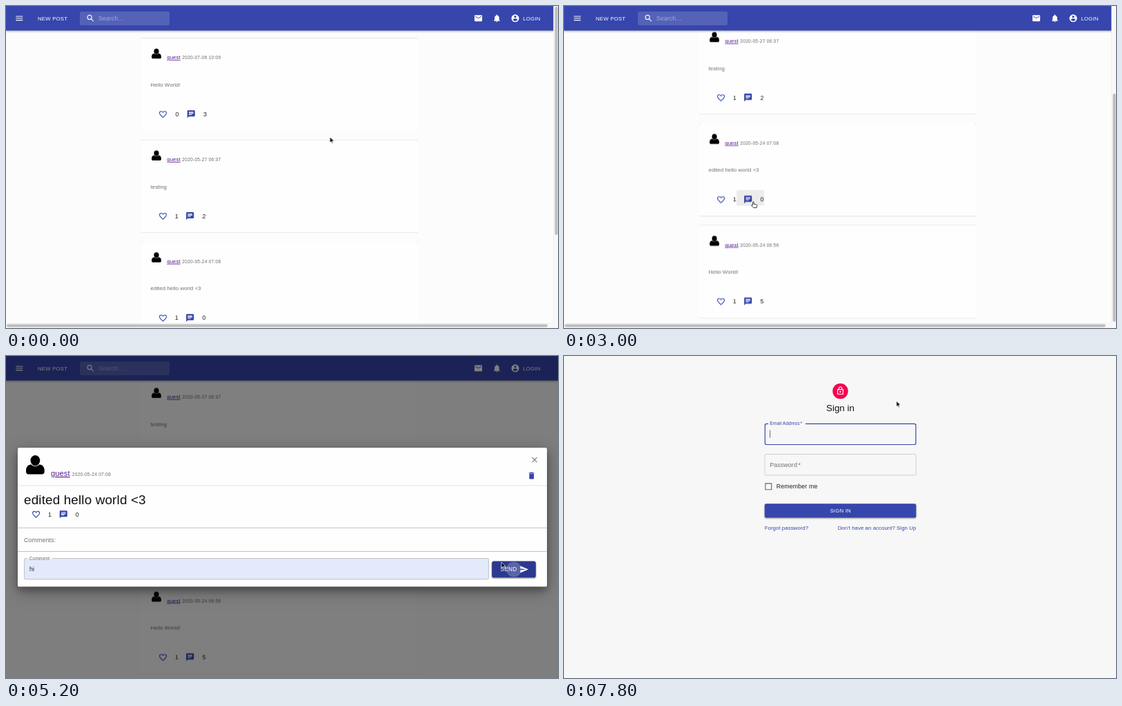
Write an HTML page that moves like this. It is 800 by 467 pixels and loops after 8 s.

```html
<!DOCTYPE html>
<html lang="en">
<head>
<meta charset="utf-8">
<title>Message board</title>
<style>
html, body { margin: 0; width: 100%; height: 100%; overflow: hidden; background: #fcfcfc; }
svg { display: block; width: 100%; height: 100%; }
text { font-family: "Liberation Sans", Arial, sans-serif; white-space: pre; }
.caption { font-size: 6.67px; letter-spacing: .0333em; fill: #6c6c6c; }
.body2 { font-size: 7.78px; letter-spacing: .0107em; fill: #707070; }
.body1 { font-size: 8.89px; letter-spacing: .0094em; fill: #222; }
.label { font-size: 6.67px; letter-spacing: .0094em; }
.button { font-size: 7.78px; letter-spacing: .0286em; fill: #fff; }
.send { font-size: 8.33px; }
.h4 { font-size: 18.9px; letter-spacing: .00735em; fill: #111; }
.h5 { font-size: 13.33px; fill: #111; }
.h6 { font-size: 11.1px; letter-spacing: .0075em; }
.user { fill: #551a8b; text-decoration: underline; }
.grey { fill: #707070; }
.blue { fill: #3646ac; }
.ui { font-family: Inter, Roboto, sans-serif; font-size: 7.2px; fill: #e8eaed; }
.line { fill: none; stroke-width: 2; }
.card { fill: #fefefe; filter: drop-shadow(0 .7px .6px rgba(0,0,0,.38)); }
.paper { filter: drop-shadow(0 6px 5px rgba(0,0,0,.25)) drop-shadow(0 5px 12px rgba(0,0,0,.3)); }
.raised { filter: drop-shadow(0 1px 1px rgba(0,0,0,.4)); }
.bar { filter: drop-shadow(0 1px 1.5px rgba(0,0,0,.35)); }
</style>
</head>
<body>
<svg id="stage" viewBox="0 0 800 467"></svg>
<script>
const LOOP = 8000;
const BLUE = '#3646ac';
const USER = 'guest';

// 24-unit icons; "line" entries are stroked
const ICONS = {
  menu: 'M3 18h18v-2H3zM3 13h18v-2H3zM3 6v2h18V6z',
  mail: 'M20 4H4c-1.1 0-2 .9-2 2v12c0 1.1.9 2 2 2h16c1.1 0 2-.9 2-2V6c0-1.1-.9-2-2-2zm0 4l-8 5-8-5V6l8 5 8-5z',
  bell: 'M12 22c1.1 0 2-.9 2-2h-4c0 1.1.9 2 2 2zm6-6v-5c0-3.1-1.6-5.6-4.5-6.3V4a1.5 1.5 0 0 0-3 0v.7C7.6 5.4 6 7.9 6 11v5l-2 2v1h16v-1z',
  account: 'M12 2a10 10 0 1 0 0 20 10 10 0 1 0 0-20zm0 3a3 3 0 1 1 0 6 3 3 0 1 1 0-6zm0 14.2c-2.5 0-4.7-1.3-6-3.2 0-2 4-3.1 6-3.1s6 1.1 6 3.1c-1.3 1.9-3.5 3.2-6 3.2z',
  chat: 'M20 2H4c-1.1 0-2 .9-2 2v18l4-4h14c1.1 0 2-.9 2-2V4c0-1.1-.9-2-2-2zM6 9h12v2H6zM14 14H6v-2h8zM18 8H6V6h12z',
  send: 'M2 21L23 12 2 3v7l15 2-15 2z',
  trash: 'M6 19c0 1.1.9 2 2 2h8c1.1 0 2-.9 2-2V7H6zM19 4h-3.5l-1-1h-5l-1 1H5v2h14z'
};
const LINE_ICONS = {
  heart: 'M12 19.9C6.5 14.9 3 11.8 3 8.5C3 6 5 4 7.5 4C9.3 4 11.1 5.1 12 6.7C12.9 5.1 14.7 4 16.5 4C19 4 21 6 21 8.5C21 11.8 17.5 14.9 12 19.9Z',
  search: 'M4 9.5a5.5 5.5 0 1 0 11 0a5.5 5.5 0 1 0-11 0M14 14l5.7 5.7',
  lock: 'M5 9h14v12H5zM8 9V6a4 4 0 0 1 8 0v3M11 15a1 1 0 1 0 2 0a1 1 0 1 0-2 0',
  box: 'M4 4h16v16H4z',
  close: 'M5.7 5.7l12.6 12.6M18.3 5.7L5.7 18.3'
};

const icon = (name, x, y, color = BLUE) => {
  const look = LINE_ICONS[name]
    ? `class="line" stroke="${color}"` : `fill="${color}" fill-rule="evenodd"`;
  return `<path d="${LINE_ICONS[name] || ICONS[name]}" ${look}
    transform="translate(${x} ${y}) scale(.555) translate(-12 -12)"/>`;
};
const text = (x, y, cls, str, extra = '') =>
  `<text x="${x}" y="${y}" class="${cls}" ${extra}>${str.replace(/</g, '&lt;')}</text>`;
const rect = (x, y, w, h, fill, extra = '') =>
  `<rect x="${x}" y="${y}" width="${w}" height="${h}" fill="${fill}" ${extra}/>`;
const group = (id, ...parts) => `<g id="${id}">${parts.join('')}</g>`;
const middle = 'text-anchor="middle"';

const avatar = (x, y, scale) => `<g transform="translate(${x} ${y}) scale(${scale})">
  <ellipse cy="-6.4" rx="6.9" ry="7.7"/>
  <path d="M-13.4 9C-13.4 3-11 0-6.2-.8C-3 2.9 3 2.9 6.2-.8C11 0 13.4 3 13.4 9C13.4 13 11 13.6 9 13.6H-9C-11 13.6-13.4 13-13.4 9Z"/></g>`;

const post = ([date, message, likes, comments, shift], i) => `
  <g transform="translate(0 ${46.6 + i * 147.75})">
    ${rect(196, 0, 401, 134.4, '#fefefe', 'rx="2.2" class="card"')}
    ${avatar(218, 22.6, .52)}
    ${text(233.3, 30.7, 'body2 user', USER)}
    ${text(255.3, 30.7, 'caption', date)}
    ${text(209.5, 70.2, 'body2', message)}
    ${icon('heart', 227.5, 110.6)}
    ${text(244.7 + shift / 2, 113.2, 'body1', likes)}
    ${icon('chat', 266.7 + shift, 110.3)}
    ${text(284.5 + shift, 113.2, 'body1', comments)}
  </g>`;

const posts = [
  ['2020-07-06 10:09', 'Hello World!', '0', '3', 1.6],
  ['2020-05-27 06:37', 'testing', '1', '2', 0],
  ['2020-05-24 07:08', 'edited hello world <3', '1', '0', 0],
  ['2020-05-24 06:56', 'Hello World!', '1', '5', 0]
];

const header = [
  rect(0, -4, 800, 39.6, BLUE, 'class="bar"'),
  icon('menu', 19.3, 17.8, '#fff'),
  text(46, 20.6, 'button', 'NEW POST'),
  rect(107, 8, 130, 20, '#fff', 'fill-opacity=".15" rx="2.2"'),
  icon('search', 122.5, 17.8, '#fff'),
  text(133.7, 20.8, 'body1', 'Search…', 'style="fill:#fff;opacity:.45"'),
  icon('mail', 684.5, 17.8, '#fff'),
  icon('bell', 711.4, 17.8, '#fff'),
  icon('account', 738, 17.8, '#fff'),
  text(749.3, 20.6, 'button', 'LOGIN')
].join('');

const scrollbars = group('scrollbars',
  rect(793.5, 0, 6.5, 467, '#f8f8f8'), rect(0, 460, 800, 7, '#f8f8f8'),
  rect(793.3, 0, .5, 460, '#e6e6e6'), rect(0, 459.8, 793, .5, '#e6e6e6'),
  rect(1, 461.5, 784, 4.2, '#bfbfbf', 'rx="2.1"'),
  group('thumb', rect(795.4, 1, 4.2, 331, '#bfbfbf', 'rx="2.1"')));

const outline = (x, y, w, h, color, width) =>
  rect(x, y, w, h, 'none', `rx="2.2" stroke="${color}" stroke-width="${width}"`);

const modal = group('modal',
  rect(17, 133, 767, 201.6, '#fefefe', 'rx="2.2" class="paper"'),
  avatar(42.4, 158, 1),
  text(65, 174, 'h6 user', USER),
  text(95.8, 174.2, 'caption', '2020-05-24 07:08'),
  icon('close', 766, 150.5, '#858585'),
  icon('trash', 761.7, 173.6),
  rect(17, 187.6, 767, .6, '#d2d2d2'),
  text(26, 215.3, 'h4', 'edited hello world <3'),
  icon('heart', 43.6, 229.8),
  text(61, 232.6, 'body1', '1'),
  icon('chat', 83.3, 229.8),
  text(100.8, 232.6, 'body1', '0'),
  rect(17, 248.8, 767, .8, '#b4b4b4'),
  text(26, 269.6, 'body1 grey', 'Comments:'),
  rect(17, 283.2, 767, .8, '#b4b4b4'),
  group('fieldFill', rect(26.5, 293.5, 673, 30, '#e2eafc', 'rx="2.2"')),
  group('fieldIdle', outline(26.4, 293.4, 673.2, 30.4, '#a4a4a4', .7)),
  group('fieldFocus', outline(26.7, 293.7, 672.7, 29.8, BLUE, 1.3)),
  group('placeholder', text(34, 311.8, 'body1 grey', 'Comment')),
  group('notch', rect(31.2, 292.6, 35.2, 1.9, '#fefefe')),
  group('labelFocus', text(33.8, 295.6, 'label blue', 'Comment')),
  group('labelIdle', text(33.8, 295.6, 'label grey', 'Comment')),
  group('preview', text(34.4, 311.6, 'ui', 'hi', 'style="fill:#222"')),
  group('value', text(34, 311.6, 'body1', 'hi')),
  group('caret', rect(34, 303.5, .8, 10.5, '#222')),
  rect(704.5, 297.8, 63, 23.3, BLUE, 'rx="2.2" class="raised"'),
  group('sendHover', rect(704.5, 297.8, 63, 23.3, '#2c3990', 'rx="2.2" class="raised"')),
  group('ripple', '<circle cx="736" cy="309.5" r="11" fill="#fff" opacity=".22"/>'),
  text(716.4, 312.4, 'button send', 'SEND'),
  icon('send', 751, 309.4, '#fff'));

const options = ['hi', 'test', 'nice', 'good', 'testing', 'testing +1'];
const dropdown = group('dropdown',
  rect(26, 325.6, 106.5, 128.6, '#202427', 'rx="1.5" class="raised"'),
  group('optionHover', rect(26, 330, 106.5, 20, '#3c4043')),
  ...options.map((o, i) => text(32.8, 342.6 + 20 * i, 'ui', o, 'font-weight="500"')));

const alertBox = group('alert',
  rect(276, -5, 249, 75.3, '#202427', 'rx="3" class="raised"'),
  text(285, 15.8, 'ui', 'localhost:3000 says', 'style="font-size:8.3px"'),
  text(285, 31.6, 'ui', 'Please login first', 'style="fill:#a0a5aa"'),
  rect(480.3, 43.5, 35.7, 17.4, '#7ba6f3', 'rx="2"'),
  text(498, 54.5, 'ui', 'OK', `${middle} style="font-size:6.7px;fill:#202427" font-weight="500"`));

const signIn = group('signIn',
  rect(0, 0, 800, 467, '#f7f7f7'),
  '<circle cx="400.5" cy="51" r="11.2" fill="#f20550"/>',
  icon('lock', 400.5, 50.3, '#fff'),
  text(400.5, 80.2, 'h5', 'Sign in', middle),
  outline(291.3, 98.3, 218.6, 30.2, BLUE, 1.2),
  rect(296, 97, 54, 2.4, '#f7f7f7'),
  text(298.3, 100.2, 'label blue', 'Email Address<tspan dx="1">*</tspan>'.replace(/<.*/, '')),
  text(342.6, 100.2, 'label blue', '*'),
  rect(298.3, 107.6, .8, 11, '#444'),
  outline(291, 142.4, 219.2, 30.6, '#bcbcbc', .7),
  text(298.3, 160.6, 'body1 grey', 'Password'),
  text(339.4, 160.6, 'body1 grey', '*'),
  icon('box', 296.3, 189.3, '#666'),
  text(307.8, 192.4, 'body1', 'Remember me'),
  rect(290.8, 214.3, 219.5, 20.2, BLUE, 'rx="2.2" class="raised"'),
  text(400.7, 227.3, 'button', 'SIGN IN', middle),
  text(290.7, 251.6, 'body2 blue', 'Forgot password?'),
  text(510.3, 251.6, 'body2 blue', "Don't have an account? Sign Up", 'text-anchor="end"'));

const cursor = group('cursor',
  group('arrow', '<path d="M0 0V8.2L1.9 6.5L3.1 9.3L4.4 8.7L3.2 6H5.8Z" stroke="#fff" stroke-width=".7"/>'),
  group('hand', `<path d="M-.4 .4C-.4-.4 1.2-.4 1.2.4V3.2L5 4C5.7 4.2 5.8 4.8 5.7 5.5L5.2 8.6H.7L-2.4 5.2C-2.6 4.4-1.4 4-.4 5Z"
    fill="#fff" stroke="#111" stroke-width=".8"/>`),
  group('beam', '<path d="M-1.7-4.2Q0-4.2 0-3Q0-4.2 1.7-4.2M0-3V3M-1.7 4.2Q0 4.2 0 3Q0 4.2 1.7 4.2M-.9 1.4H.9" fill="none" stroke="#111" stroke-width=".8"/>'));

document.getElementById('stage').innerHTML = [
  rect(0, 0, 800, 467, '#fcfcfc'),
  group('feed', posts.map(post).join(''),
    group('iconHover', rect(250, 438.5, 40, 23, '#000', 'rx="3" opacity=".07"'))),
  header, scrollbars,
  group('backdrop', rect(0, 0, 800, 467, '#000', 'opacity=".5"')),
  modal, dropdown, alertBox, signIn, cursor
].join('');

// Steps are [ms, value]; each value holds until the next step
const play = (id, prop, steps) => {
  const frames = steps.map(([ms, v]) => ({ offset: ms / LOOP, [prop]: v, easing: 'step-end' }));
  frames.push({ offset: 1, [prop]: steps[steps.length - 1][1] });
  document.getElementById(id).animate(frames, { duration: LOOP, iterations: Infinity });
};
const fade = (id, ...steps) => play(id, 'opacity', [[0, 0], ...steps]);
const show = (id, ...spans) => fade(id, ...spans.flatMap(([a, b]) => b < LOOP ? [[a, 1], [b, 0]] : [[a, 1]]));
const move = (id, steps) =>
  play(id, 'transform', steps.map(([ms, x, y]) => [ms, `translate(${x}px, ${y}px)`]));

const scroll = [[0, 0], [200, 9], [400, 42], [600, 92], [800, 136], [1000, 163], [1200, 171.7]];
move('feed', [...scroll.map(([ms, y]) => [ms, 0, -y]), [3200, 0, -163.3]]);
move('thumb', scroll.map(([ms, y]) => [ms, 0, y * .734]));

move('cursor', [
  [0, 469.5, 190], [1600, 440, 198], [1800, 345, 222], [2000, 274.5, 237.3],
  [2200, 269, 255], [2400, 269, 271], [2600, 270, 278], [2800, 272, 281], [3000, 274, 284],
  [3200, 274.7, 298.5], [3400, 270, 303], [3600, 262, 308], [3800, 225, 313],
  [4000, 180, 327], [4200, 140, 337], [4400, 122, 339], [4800, 250, 333],
  [5000, 620, 306], [5200, 718, 299], [5400, 720, 297],
  [6400, 710, 284], [6600, 655, 222], [6800, 575, 134], [7000, 512, 74], [7200, 491, 56],
  [7400, 489, 54.5], [7600, 485, 61], [7800, 481.8, 65.3]
]);
play('arrow', 'opacity', [[0, 1], [200, 0], [4000, 1], [5000, 0], [5200, 1]]);
show('hand', [200, 3200]);
show('beam', [3200, 4000], [5000, 5200]);

show('iconHover', [2800, 7600]);
play('scrollbars', 'opacity', [[0, 1], [3200, 0]]);
show('backdrop', [3200, LOOP]);
fade('modal', [3200, .9], [3400, 1]);

show('fieldFocus', [3600, 5200]);
play('fieldIdle', 'opacity', [[0, 1], [3600, 0], [5200, 1]]);
play('placeholder', 'opacity', [[0, 1], [3600, 0]]);
show('notch', [3600, LOOP]);
show('labelFocus', [3600, 5200]);
show('labelIdle', [5200, LOOP]);
show('dropdown', [3800, 4800]);
show('optionHover', [4400, 4800]);
show('preview', [4400, 4800]);
show('fieldFill', [4400, LOOP]);
show('value', [4800, LOOP]);
show('caret', [3600, 4800]);
show('sendHover', [5200, LOOP]);
show('ripple', [5200, 5600]);

const tucked = 'translate(4.8px, -2.6px) scale(.988)';
play('alert', 'transform', [[0, tucked], [5600, 'none'], [7400, tucked]]);
fade('alert', [5400, .84], [5600, 1], [7400, .84], [7600, 0]);
show('signIn', [7600, LOOP]);
</script>
</body>
</html>
```
